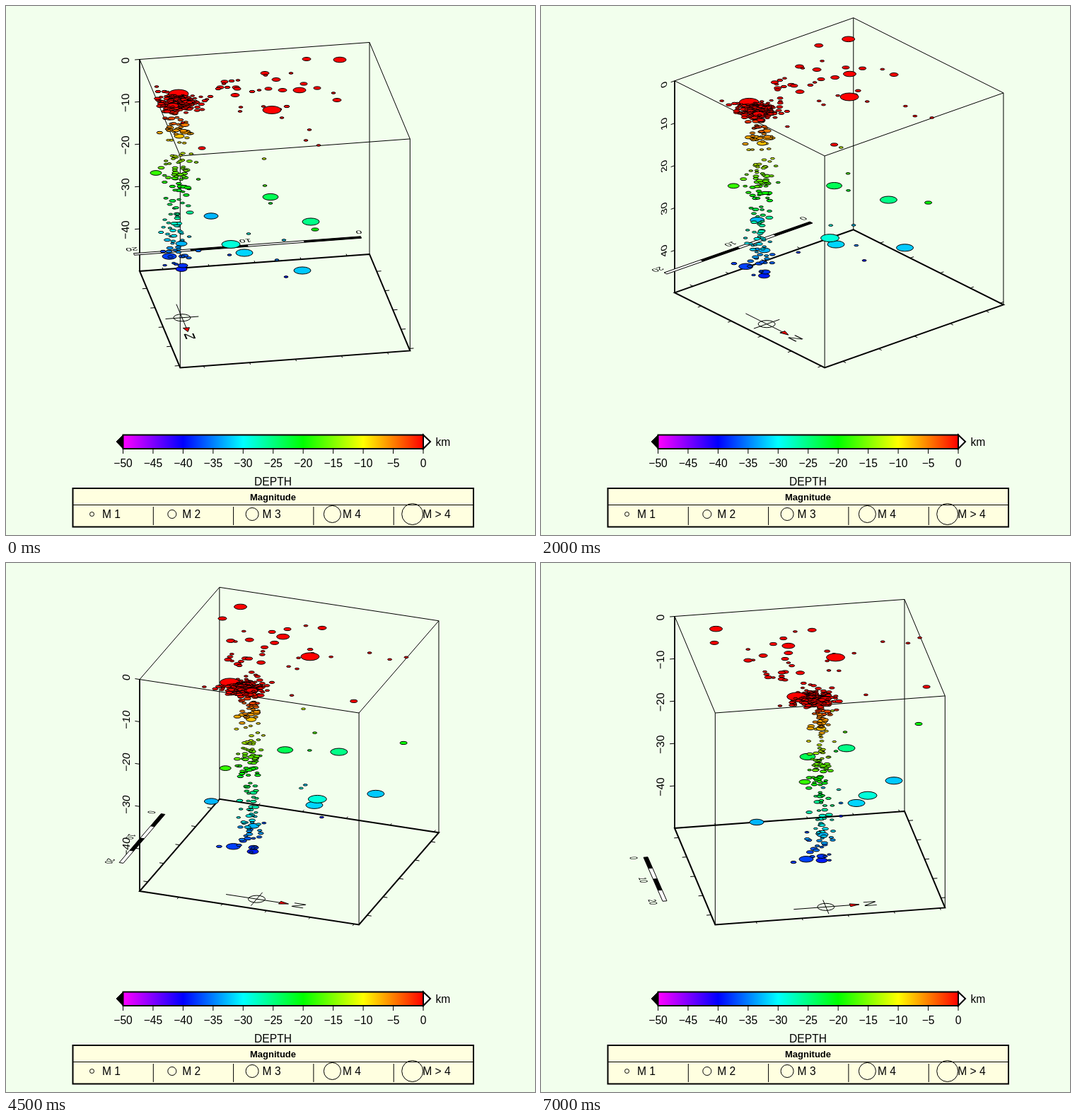
Recreate the animation shown at these times as an HTML page with a canvas. Size 748 by 748 pixels, loop 8 s.

```html
<!DOCTYPE html>
<html lang="en">
<head>
<meta charset="utf-8">
<title>Earthquake depth cube</title>
<style>
html, body { margin: 0; width: 100%; height: 100%; overflow: hidden; background: #f2ffed; }
canvas { display: block; }
</style>
</head>
<body>
<canvas id="stage" width="748" height="748"></canvas>
<script>
const ctx = document.getElementById('stage').getContext('2d');
const SIDE = 330, HEIGHT = 299.5, TILT = 0.42, MAX_KM = 50;
const FONT = '"Liberation Sans", Arial, sans-serif';

// Scale bar ends per view: x, y at 0 km, then x, y at 20 km
const BARS = [
  [502, 327, 181, 351], [382, 306, 176, 378],
  [222, 355, 163, 424], [148, 416, 175, 478]
];

// The camera turns 30 degrees per view; the box keeps its left and lower limits.
function makeView(bar, i) {
  const a = (10 + 30 * i) * Math.PI / 180;
  const s = SIDE * Math.sin(a), c = SIDE * Math.cos(a);
  const E = [-c, s * TILT], N = [s, c * TILT];
  const corners = [[0, 0], [1, 0], [1, 1], [0, 1]];
  const xs = corners.map(([e, n]) => e * E[0] + n * N[0]);
  const ys = corners.map(([e, n]) => e * E[1] + n * N[1]);
  const left = Math.min(...xs);
  const ox = 189 - left, oy = 212 - Math.max(...ys);
  const project = (e, n, z = 0) => [
    ox + e * E[0] + n * N[0],
    oy + e * E[1] + n * N[1] + z * HEIGHT
  ];
  const out = Math.abs(E[0]) > Math.abs(N[0]) ? E : N.map(v => -v);
  return {
    E, N, corners, bar, project, ox, oy,
    axis: corners[xs.indexOf(left)],
    out: out.map(v => v / SIDE),
    minus: i === 1 ? '' : '\u2212'
  };
}
const views = BARS.map(makeView);

// Shallow events: x, y in the first view, radius
const shallow = [
  472, 76, 9, 425, 75, 6, 366, 95, 6, 403, 95, 3, 382, 104, 6, 421, 110, 5,
  415, 119, 9, 391, 119, 6, 371, 117, 5, 348, 121, 4, 358, 119, 3, 440, 116, 5,
  463, 123, 3, 468, 133, 6, 376, 147, 13, 397, 142, 4, 390, 158, 3, 429, 175, 3,
  424, 190, 3, 442, 197, 3, 387, 146, 3, 364, 142, 3, 277, 201, 5, 324, 126, 6,
  325, 115, 5, 327, 117, 5, 309, 107, 5, 308, 110, 3, 303, 115, 5, 300, 117, 4,
  313, 115, 4, 328, 105, 3, 319, 106, 4, 332, 143, 3, 331, 149, 3, 289, 128, 4,
  284, 132, 3, 281, 134, 4, 367, 98, 3, 250, 165, 3, 213, 114, 3, 215, 121, 4,
  224, 121, 4, 228, 149, 5, 244, 124, 14, 236, 141, 8
];

// Deep events: x, y in the first view, x in the last view, radius
const deep = [
  374, 270, 377, 11, 431, 305, 432, 12, 437, 316, 534, 5, 318, 337, 462, 13,
  337, 349, 446, 12, 419, 374, 499, 12, 290, 297, 305, 10, 212, 236, 373, 8,
  231, 354, 375, 10, 250, 367, 397, 7, 248, 372, 397, 8, 248, 336, 398, 8,
  253, 178, 398, 7, 245, 184, 396, 7, 232, 172, 381, 5, 253, 168, 396, 6,
  247, 255, 391, 5, 255, 232, 392, 5, 260, 292, 391, 5, 365, 216, 412, 3,
  366, 254, 430, 3, 374, 279, 417, 3, 396, 383, 424, 3, 383, 359, 424, 3,
  393, 331, 399, 3, 343, 322, 421, 3, 316, 352, 376, 3, 269, 221, 394, 3,
  272, 245, 395, 3, 272, 346, 379, 4, 222, 347, 357, 4
];

let seed = 7;
function random() {
  seed = (seed * 16807) % 2147483647;
  return seed / 2147483647;
}
const spread = () => (random() + random() + random() + random() - 2) * 1.7;

function buildEvents() {
  const first = views[0], last = views[3];
  const list = [];
  // The first and last views are a quarter turn apart, so their x values fix the map position.
  const locate = (x, across) => {
    const p = x - first.ox, [c, s] = [-first.E[0], first.N[0]];
    return [(s * across - c * p) / SIDE ** 2, (s * p + c * across) / SIDE ** 2];
  };
  for (let i = 0; i < shallow.length; i += 3) {
    const [x, y, r] = shallow.slice(i, i + 3);
    const [e, n] = locate(x, (y - first.oy) / TILT);
    list.push({ e, n, z: 0, r });
  }
  for (let i = 0; i < deep.length; i += 4) {
    const [x, y, x2, r] = deep.slice(i, i + 4);
    const [e, n] = locate(x, x2 - last.ox);
    list.push({ e, n, z: (y - first.project(e, n)[1]) / HEIGHT, r });
  }
  const swarm = (count, e, n, de, dn, top, bottom) => {
    for (let i = 0; i < count; i++) {
      list.push({
        e: Math.min(e + spread() * de, 0.995),
        n: n + spread() * dn,
        z: (top + random() * (bottom - top)) / MAX_KM,
        r: 2.8 + random() ** 2 * 2.2
      });
    }
  };
  swarm(230, 0.91, 0.437, 0.037, 0.037, 0, 0.8);
  const bands = [[14, 0.8, 4], [22, 4.5, 9], [8, 9, 13], [55, 13, 28], [34, 28, 38]];
  for (const [count, top, bottom] of bands) {
    swarm(count, 0.925, 0.473, 0.034, 0.024, top, bottom);
  }
  return list;
}
const events = buildEvents();

function path(points, { fill, width = 1, close = true, stroke = true } = {}) {
  ctx.beginPath();
  points.forEach(p => ctx.lineTo(...p));
  if (close) ctx.closePath();
  if (fill) { ctx.fillStyle = fill; ctx.fill(); }
  if (stroke) { ctx.lineWidth = width; ctx.stroke(); }
}
const line = (a, b, width = 1) => path([a, b], { width, close: false });

function ellipse(x, y, rx, ry, fill) {
  ctx.beginPath();
  ctx.ellipse(x, y, rx, ry, 0, 0, Math.PI * 2);
  if (fill) { ctx.fillStyle = fill; ctx.fill(); }
  ctx.lineWidth = 1;
  ctx.stroke();
}

function text(str, x, y, { size = 15.6, align = 'left', weight = '' } = {}) {
  ctx.font = `${weight} ${size}px ${FONT}`;
  ctx.textAlign = align;
  ctx.fillStyle = '#000';
  ctx.fillText(str, x, y);
}

// Text in a plane spanned by its reading direction and its downward direction
function planeText(str, [x, y], right, down, size, shift = 0, align = 'center') {
  ctx.setTransform(right[0], right[1], down[0], down[1], x, y);
  text(str, shift, size * 0.358, { size, align });
  ctx.setTransform(1, 0, 0, 1, 0, 0);
}
const groundText = (view, str, at, size) =>
  planeText(str, at, view.E.map(v => v / SIDE), view.N.map(v => -v / SIDE), size);

function drawBox({ corners, project }) {
  const top = corners.map(([e, n]) => project(e, n));
  const floor = corners.map(([e, n]) => project(e, n, 1));
  path(top);
  path(floor, { width: 2 });
  top.forEach((p, i) => line(p, floor[i]));
  const tick = 6.5 / SIDE;
  for (let k = 0; k < 5; k++) {
    const e = 0.098 + 0.2 * k, n = 0.178 + 0.2 * k;
    line(project(e, 0, 1), project(e, -tick, 1));
    line(project(e, 1, 1), project(e, 1 + tick, 1));
    line(project(0, n, 1), project(-tick, n, 1));
    line(project(1, n, 1), project(1 + tick, n, 1));
  }
}

function drawDepthAxis({ axis, project, out, minus }) {
  line(project(...axis), project(...axis, 1), 1.6);
  for (let km = 0; km < MAX_KM; km += 10) {
    const [x, y] = project(...axis, km / MAX_KM);
    const at = d => [x + out[0] * d, y + out[1] * d];
    line([x, y], at(7));
    const inward = out.map(v => -v);
    if (km) planeText(minus + km, at(20.5), [0, -1], inward, 15.6, 13.2, 'right');
    else planeText('0', at(20.5), [0, -1], inward, 15.6);
  }
}

function drawScaleBar(view) {
  const [x0, y0, x1, y1] = view.bar;
  const at = (f, d = 0) => [
    x0 + (x1 - x0) * f + view.N[0] / SIDE * d,
    y0 + (y1 - y0) * f + view.N[1] / SIDE * d
  ];
  for (let k = 0; k < 4; k++) {
    const a = k / 4, b = a + 0.25;
    path([at(a, -3), at(b, -3), at(b, 3), at(a, 3)], { fill: k % 2 ? '#fff' : '#000' });
  }
  ['0', '10', '20'].forEach((label, i) => groundText(view, label, at(i / 2, -17), 15.6));
}

function drawCompass(view) {
  const at = (e, n) => view.project(0.9036 + e, 0.4986 + n, 1);
  ellipse(...at(0, 0), 12, 12 * TILT);
  line(at(-0.072, 0), at(0.072, 0));
  line(at(0, -0.14), at(0, 0.11));
  path([at(-0.014, 0.105), at(0.014, 0.105), at(0, 0.145)], { fill: '#f00' });
  groundText(view, 'N', at(0, 0.193), 25);
}

function drawEvents({ project }) {
  events
    .map(q => {
      const near = project(q.e, q.n)[1] * 2.16 - q.z * 139;
      return { ...q, near, at: project(q.e, q.n, q.z) };
    })
    .sort((a, b) => a.near - b.near)
    .forEach(q => {
      const hue = 6 * q.z * MAX_KM;
      ellipse(...q.at, q.r, q.r * TILT, `hsl(${hue}, 100%, 50%)`);
    });
}

function drawColorBar() {
  const x0 = 165.5, x1 = 590, top = 606.5, bottom = 626, mid = 616;
  const ramp = ctx.createLinearGradient(x0, 0, x1, 0);
  ['#f0f', '#00f', '#0ff', '#0f0', '#ff0', '#f00'].forEach((c, i) => ramp.addColorStop(i / 5, c));
  path([[x0, top], [156, mid], [x0, bottom]], { fill: '#000' });
  path([[x1, top], [600, mid], [x1, bottom]], { fill: '#fff', width: 2 });
  path([[x0, top], [x1, top], [x1, bottom], [x0, bottom]], { fill: ramp, width: 2 });
  for (let k = 0; k <= 10; k++) {
    const x = x0 + (x1 - x0) * k / 10, value = 50 - 5 * k;
    line([x, bottom], [x, bottom + 7]);
    text((value ? '\u2212' : '') + value, x, 652, { align: 'center' });
  }
  text('km', 607.5, 621.5);
  text('DEPTH', 377.5, 678, { align: 'center' });
}

function drawMagnitudes() {
  path([[94.5, 682], [661, 682], [661, 736.5], [94.5, 736.5]], { fill: '#ffffe0', width: 2 });
  line([95, 705.5], [661, 705.5]);
  text('Magnitude', 377.5, 699, { size: 13, align: 'center', weight: 'bold' });
  ['M 1', 'M 2', 'M 3', 'M 4', 'M > 4'].forEach((label, i) => {
    const x = 121.5 + 113.3 * i;
    ellipse(x, 718.5, 3 * (i + 1), 3 * (i + 1));
    text(label, x + 14.5, 724);
    if (i) line([x - 26.5, 708], [x - 26.5, 734]);
  });
}

function draw(view) {
  ctx.fillStyle = '#f2ffed';
  ctx.fillRect(0, 0, 748, 748);
  ctx.strokeStyle = '#000';
  ctx.lineJoin = 'miter';
  drawBox(view);
  drawDepthAxis(view);
  drawScaleBar(view);
  drawCompass(view);
  drawEvents(view);
  drawColorBar();
  drawMagnitudes();
}

const start = performance.now();
let shown = -1;
function tick() {
  const t = (performance.now() - start) % 8000;
  const index = t < 500 ? 0 : 1 + Math.floor((t - 500) / 2500);
  if (index !== shown) draw(views[shown = index]);
  requestAnimationFrame(tick);
}
tick();
</script>
</body>
</html>
```
